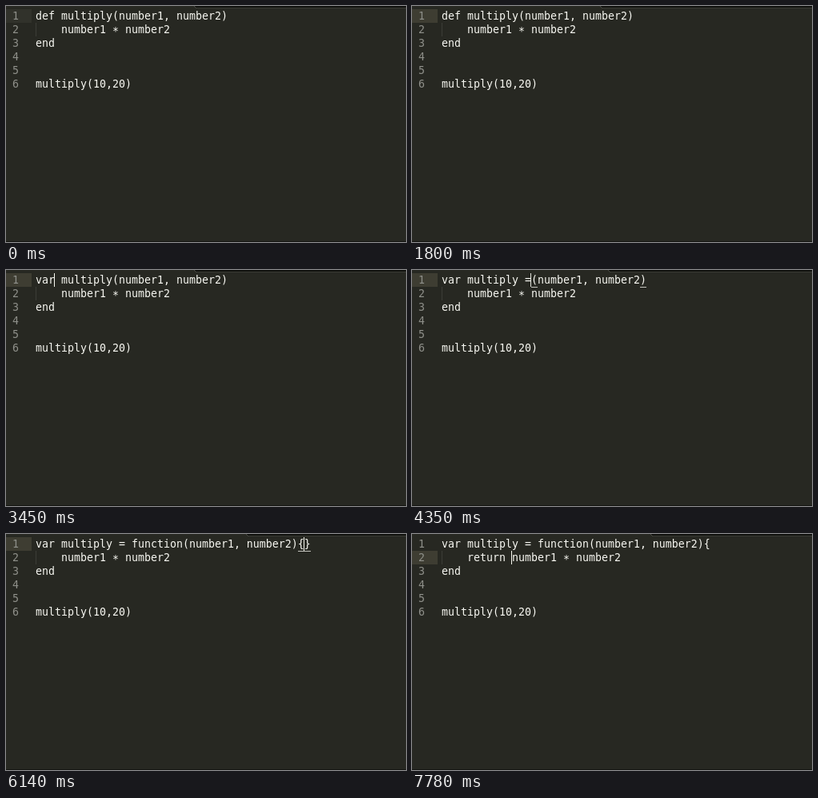
Write an HTML page that moves like this. It is 500 px wide and 295 px high and loops after 8 s.

```html
<!DOCTYPE html>
<html lang="en">
<head>
<meta charset="utf-8">
<style>
  html, body { margin: 0; width: 100%; height: 100%; overflow: hidden; background: #272822; }
  #stage {
    position: relative; width: 500px; height: 295px; overflow: hidden;
    background: #272822; color: #f8f8f2;
    font: 13.29px/17px "DejaVu Sans Mono", monospace;
    font-variant-ligatures: none;
  }
  #stage > * { position: absolute; }
  .row { left: 37px; height: 17px; white-space: pre; }
  .num { left: 8px; color: #8f908a; }
  .star { position: relative; top: 2px; }
  #active { left: 0; width: 32px; height: 17px; }
  #guide { left: 37px; top: 21px; width: 1px; height: 17px; background: #3c3d36; }
  #caret { width: 1px; height: 17px; background: #f8f8f0; }
  .mark { top: 21px; width: 8px; height: 1px; background: #c4c4be; }
  #strip { top: 0; right: 0; height: 2px; background: #10110e; border-bottom: 1px solid #393a34; }
  #corner { top: 0; width: 3px; height: 3px; background: linear-gradient(45deg, #272822 45%, #4a4b45 50%, #10110e 62%); }
  #base { left: 0; bottom: 0; width: 500px; height: 1px; background: #151612; }
</style>
</head>
<body>
<div id="stage">
  <div id="strip"></div><div id="corner"></div>
  <div id="active"></div><div id="guide"></div>
  <div class="mark"></div><div class="mark"></div>
  <div id="caret"></div><div id="base"></div>
</div>
<script>
const LOOP = 8000, CELL = 8, LINE = 17, TOP = 4;
const stage = document.getElementById("stage");
const [strip, corner, active, caret] =
  ["strip", "corner", "active", "caret"].map(id => document.getElementById(id));
const marks = [...document.querySelectorAll(".mark")];

function addRow(cls, i, text) {
  const el = document.createElement("div");
  el.className = cls;
  el.style.top = TOP + i * LINE + "px";
  el.textContent = text;
  stage.insertBefore(el, caret);
  return el;
}

const product = "number1 * number2";
const rows = ["", "", "end", "", "", "multiply(10,20)"].map((text, i) => {
  addRow("row num", i, i + 1);
  return addRow("row", i, text);
});
rows[1].innerHTML = '    <span></span>number1 <span class="star">*</span> number2';
const typed = rows[1].firstElementChild;

const args = "(number1, number2)";
const fn = name => "var multiply = " + name + args;
const full = fn("function");

// Each step keeps the values it does not set
const steps = [
  [0, { head: "def multiply" + args, word: "", row: 0, col: 0, caret: 0, tab: 237, lit: "#31322b" }],
  [300, { caret: 1, lit: "#36362e" }],
  [750, { caret: .5, lit: "#3a3a30" }],
  [900, { caret: 0, lit: "#3e3d32" }],
  [1350, { caret: .5 }],
  [1500, { caret: 1 }],
  [1650, { caret: .5 }],
  [1800, { caret: 0 }],
  [2400, { caret: 1 }],
  [2700, { head: "f multiply" + args, tab: 221 }],
  [2850, { head: " multiply" + args, tab: 217 }],
  [3300, { head: "va multiply" + args, col: 2, tab: 232 }],
  [3450, { head: "var multiply" + args, col: 3, tab: 237 }],
  [3900, { head: "var multiply " + args, col: 13, tab: 240 }],
  [4050, { head: "var multiply =" + args, col: 14, tab: 247 }],
  [4350, { caret: .9 }],
  [4500, { head: fn("fun"), col: 18, caret: 1, tab: 272 }],
  [4800, { caret: .85 }],
  [4950, { caret: .4 }],
  [5100, { caret: 0 }],
  [5240, { head: fn("funtcion"), col: 23, caret: 1, tab: 302 }],
  [5540, { head: fn("func"), col: 19, tab: 278 }],
  [5690, { head: fn("functio"), col: 22, tab: 296 }],
  [5840, { head: full, col: 23, tab: 302 }],
  [5990, { col: 41 }],
  [6140, { head: full + "{}", col: 42 }],
  [6290, { col: 43 }],
  [6440, { head: full + "{", col: 42, tab: 300 }],
  [6740, { caret: .85 }],
  [6890, { caret: .4 }],
  [7190, { word: "return", row: 1, col: 10, caret: 1 }],
  [7480, { caret: .85 }],
  [7630, { caret: .4 }],
  [7780, { word: "return ", col: 11, caret: 1 }]
];
let last = {};
const states = steps.map(([at, change]) => last = { ...last, ...change, at });

// Columns of the bracket pair that touches the caret
function bracketPair({ head, row, col }) {
  if (row) return [];
  for (const [open, close] of ["{}", "()"]) {
    const a = head.indexOf(open), b = head.indexOf(close);
    if (a >= 0 && b >= 0 && [a, a + 1, b, b + 1].includes(col)) return [a, b];
  }
  return [];
}

function draw(s) {
  rows[0].textContent = s.head;
  typed.textContent = s.word;
  active.style.top = caret.style.top = TOP + s.row * LINE + "px";
  active.style.background = s.lit;
  caret.style.left = 36 + s.col * CELL + "px";
  caret.style.opacity = s.caret;
  strip.style.left = s.tab + "px";
  corner.style.left = s.tab - 2 + "px";
  const pair = bracketPair(s);
  marks.forEach((m, i) => {
    m.hidden = !pair.length;
    m.style.left = 37 + pair[i] * CELL + "px";
  });
}

const start = performance.now();
let shown;
function tick() {
  const t = (performance.now() - start) % LOOP;
  const s = states.findLast(s => s.at <= t);
  if (s !== shown) draw(shown = s);
  requestAnimationFrame(tick);
}
tick();
</script>
</body>
</html>
```
